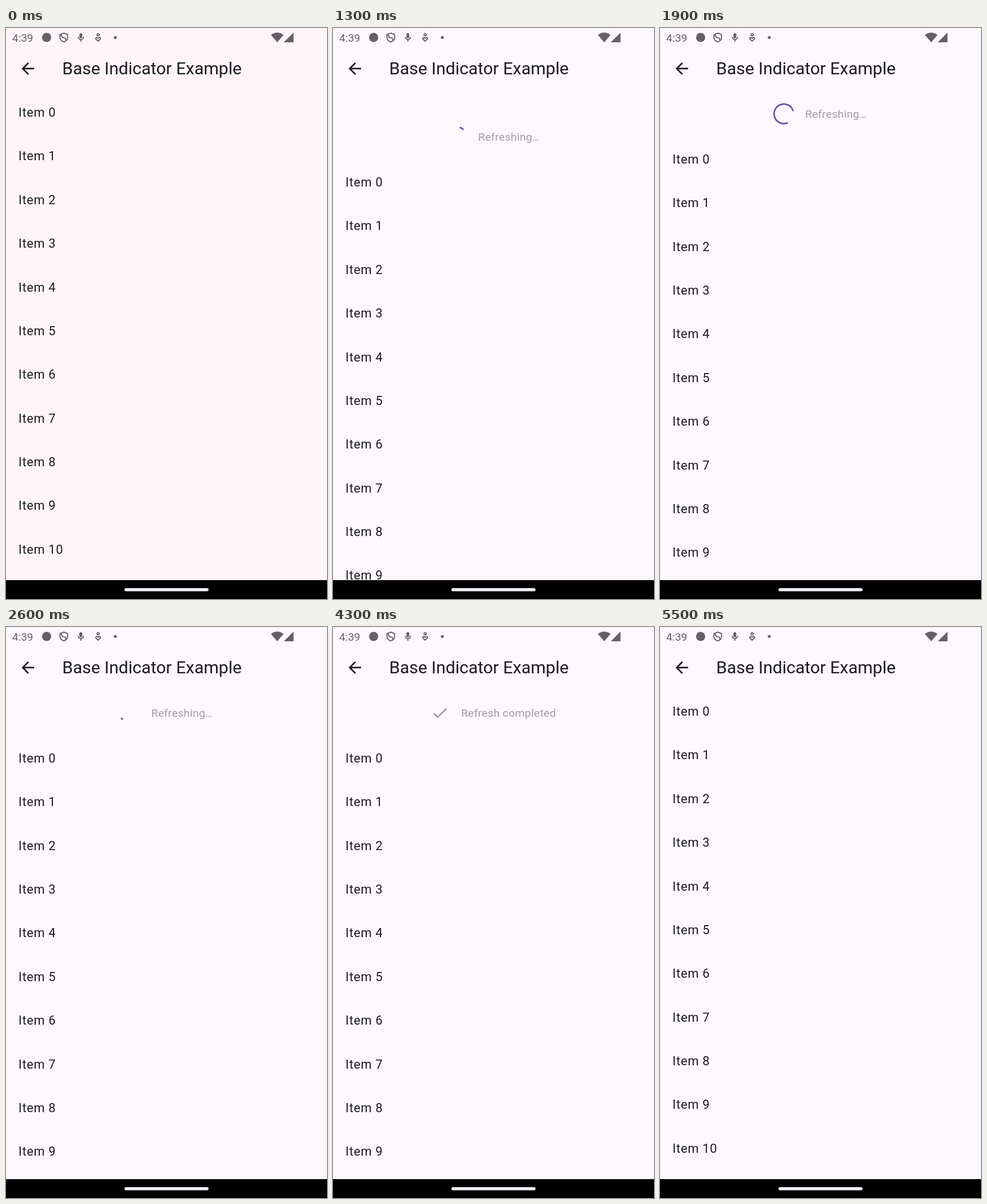
An HTML page for the animation above (6100 ms loop, 561 px wide and 998 px high).

```html
<!DOCTYPE html>
<html lang="en">
<head>
<meta charset="utf-8">
<title>Pull to refresh</title>
<style>
  html, body { margin: 0; height: 100%; overflow: hidden; background: #fdf7fe; }
  svg { display: block; font-family: Roboto, sans-serif; fill: #1d1b20; }
  #stage { width: 100vw; height: 100vh; }
  #items { font-size: 21.82px; letter-spacing: .68px; }
  #header { font-size: 19.09px; letter-spacing: .34px; fill: #9e9e9e; }
  #status { fill: #655f67; }
  .line { fill: none; stroke: #655f67; stroke-width: 1.9; }
</style>
</head>
<body>
<svg id="stage" viewBox="0 0 561 998">
  <rect id="bg" width="561" height="998"/>

  <g id="status">
    <text x="10.8" y="23.8" font-size="19.09">4:39</text>
    <circle cx="71" cy="16.5" r="8"/>
    <path class="line" d="M101 9l6.6 2.4v5q0 5.6-6.6 8-6.6-2.4-6.6-8v-5zM96 11.5l2.5 5 5 1.2 1.5 4"/>
    <rect x="128.3" y="9" width="5" height="9" rx="2.5"/>
    <path class="line" stroke-width="1.5" d="M126.3 15.5a4.6 4.6 0 0 0 9.2 0M130.9 20v4"/>
    <circle class="line" cx="161" cy="11.8" r="1.9"/>
    <path class="line" d="M161 23l-4-3.7q-.8-2.6 1.7-2.6 1.4 0 2.3 1.4.9-1.4 2.3-1.4 2.500 0 1.700 2.600z"/>
    <circle cx="191" cy="16.500" r="2.600"/>
    <path d="M463 12.200Q474 4 485 12.200L474 25z"/>
    <path d="M485.500 25H502.500V8z"/>
  </g>

  <path transform="translate(21.8 54.600) scale(1.364)"
    d="M20 11H7.830l5.590-5.590L12 4l-8 8 8 8 1.410-1.410L7.830 13H20z"/>
  <text x="98.200" y="80.900" font-size="30">Base Indicator Example</text>

  <svg y="109.100" width="561" height="855.900">
    <g id="list">
      <g id="items"></g>
      <g id="header">
        <path id="icon"/>
        <path id="arc" fill="none" stroke="#6750a4" stroke-width="2.730" stroke-linecap="square"/>
        <text id="label" y="-34.100"></text>
      </g>
    </g>
  </svg>

  <rect y="965" width="561" height="33" fill="#000"/>
  <rect x="207" y="979" width="147" height="5.500" rx="2.750" fill="#f3eef5"/>
</svg>

<script>
const LOOP = 6100, STEP = 100, DP = 1.364, ROW = 56 * DP, HEAD = 60 * DP;
const RELEASE = 1205, DONE = 4300, COLLAPSE = 4900;
const $ = id => document.getElementById(id);

const states = {
  pull: { text: "Pull down Refresh", x: 227.5,
    icon: "M20 12l-1.410-1.410L13 16.170V4h-2v12.170l-5.580-5.590L4 12l8 8z" },
  ready: { text: "Release to refresh", x: 227.1,
    icon: "M17.650 6.350C16.200 4.900 14.210 4 12 4c-4.420 0-7.990 3.580-7.990 8s3.570 8 7.990 8c3.730 0 6.840-2.550 7.730-6h-2.080c-.820 2.330-3.040 4-5.650 4-3.310 0-6-2.690-6-6s2.690-6 6-6c1.660 0 3.140.690 4.220 1.780L13 11h7V4z" },
  busy: { text: "Refreshing…", x: 253.8, icon: "" },
  done: { text: "Refresh completed", x: 223.9,
    icon: "M9 16.200L4.800 12l-1.400 1.400L9 19 21 7l-1.400-1.400z" }
};

for (let i = 0; i < 11; i++) {
  $("items").innerHTML += `<text x="21.8" y="${(i + .5) * ROW + 7.75}">Item ${i}</text>`;
}

const clamp = v => Math.min(1, Math.max(0, v));

// cubic-bezier(.4, 0, .2, 1)
function ease(x) {
  x = clamp(x);
  let lo = 0, hi = 1, s;
  for (let i = 0; i < 20; i++) {
    s = (lo + hi) / 2;
    const bx = 1.2 * s * (1 - s) ** 2 + .6 * s * s * (1 - s) + s ** 3;
    if (bx < x) lo = s; else hi = s;
  }
  return s * s * (3 - 2 * s);
}

// List offset: drag with the finger, spring to the header, collapse
const drag = [0, 43, 88, 117, 127, 122, 105, 91, 84.500, 82.300];
function offsetAt(t) {
  if (t < 800) return 0;
  if (t < 1800) return drag[Math.floor((t - 800) / STEP)];
  if (t < COLLAPSE) return HEAD;
  return t < 5500 ? 33 * Math.exp((COLLAPSE - t) / 95) : 0;
}

function stateAt(t, offset) {
  if (t >= DONE) return states.done;
  if (t >= RELEASE) return states.busy;
  return offset > 80 * DP ? states.ready : states.pull;
}

function arcPath(dt) {
  const cycle = dt / 1333 % 1, turn = 2 * Math.PI;
  const head = ease(cycle * 2) * .75, tail = ease(cycle * 2 - 1) * .75;
  const from = (tail - .25 + dt / 2222 + cycle / 4) * turn;
  const sweep = Math.max((head - tail) * turn, .001);
  const r = 12.5 * DP;
  const point = a => `${216.4 + r * Math.cos(a)} ${r * Math.sin(a) - HEAD / 2}`;
  return `M${point(from)}A${r} ${r} 0 ${+(sweep > Math.PI)} 1 ${point(from + sweep)}`;
}

function draw(now) {
  const t = Math.floor(now % LOOP / STEP) * STEP;
  const offset = offsetAt(t), state = stateAt(t, offset), warm = 1 - clamp(t / 500);
  $("bg").style.fill = `rgb(${253 + 2 * warm}, ${247 - 2 * warm}, ${254 - 6 * warm})`;
  $("list").setAttribute("transform", `translate(0 ${offset})`);
  $("header").style.display = offset > 0 ? "" : "none";
  $("label").textContent = state.text;
  $("label").setAttribute("x", state.x);
  $("icon").setAttribute("d", state.icon);
  $("icon").setAttribute("transform",
    `translate(${state.x - 39 * DP} ${-HEAD / 2 - 12 * DP}) scale(${DP})`);
  $("arc").setAttribute("d", state === states.busy ? arcPath(t - RELEASE) : "");
}

const start = performance.now();
function tick() {
  draw(performance.now() - start);
  requestAnimationFrame(tick);
}
tick();
</script>
</body>
</html>
```
